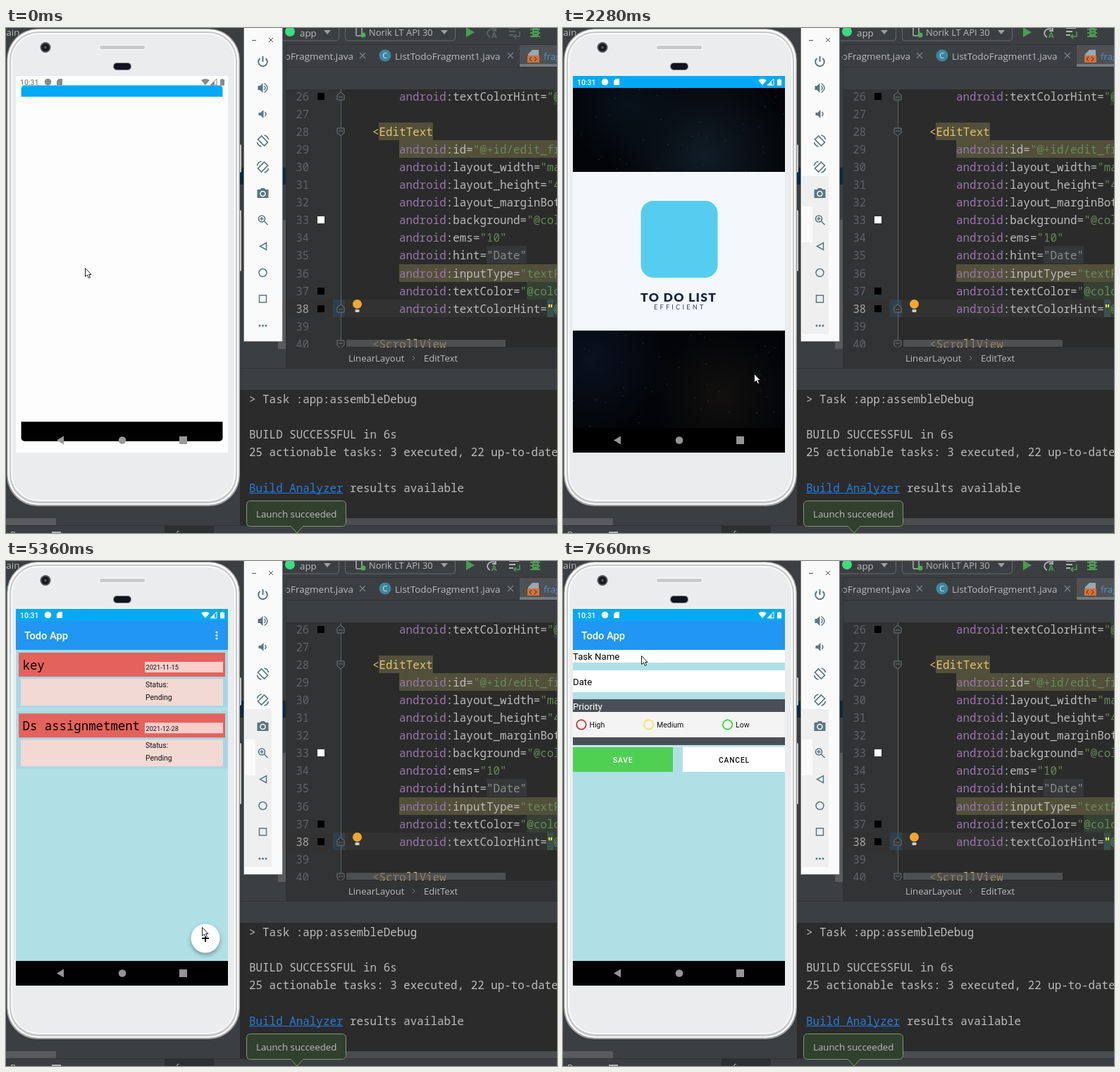
An HTML page with a canvas for the animation above (8000 ms loop, 782 by 716 pixels).

```html
<!DOCTYPE html>
<html lang="en">
<head>
<meta charset="utf-8">
<title>To-do app in an emulator</title>
<style>
html, body { margin: 0; width: 100%; height: 100%; overflow: hidden; background: #3c3f41; }
canvas { display: block; }
</style>
</head>
<body>
<canvas id="stage" width="782" height="716"></canvas>
<script>
const LOOP = 8000;
const MONO = '"Noto Sans Mono", monospace', UI = '"Open Sans", sans-serif', ROBOTO = 'Roboto, sans-serif';
const stage = document.getElementById('stage').getContext('2d');
const buffer = Object.assign(document.createElement('canvas'), { width: 782, height: 716 });
const bufferContext = buffer.getContext('2d');
let g = stage;

// ---- drawing helpers ----
function rect(x, y, w, h, color, radius = 0) {
  g.fillStyle = color;
  g.beginPath();
  g.roundRect(x, y, w, h, radius);
  g.fill();
}
function frame(x, y, w, h, color, radius = 0, width = 1) {
  g.strokeStyle = color;
  g.lineWidth = width;
  g.beginPath();
  g.roundRect(x, y, w, h, radius);
  g.stroke();
}
function disc(x, y, r, color) { rect(x - r, y - r, 2 * r, 2 * r, color, r); }
function ring(x, y, r, color, width) { frame(x - r, y - r, 2 * r, 2 * r, color, r, width); }
function shape(x, y, path, fill, line, width = 1.5) {
  const p = new Path2D(path);
  g.save();
  g.translate(x, y);
  if (fill) { g.fillStyle = fill; g.fill(p); }
  if (line) { g.strokeStyle = line; g.lineWidth = width; g.stroke(p); }
  g.restore();
}
function glow(x, y, r, color) {
  const fade = g.createRadialGradient(x, y, 0, x, y, r);
  fade.addColorStop(0, color);
  fade.addColorStop(1, color + '00');
  rect(14, 85, 301, 482, fade);
}
// y is the middle of the capitals; returns the x where the text ends
function text(s, x, y, size, color, font = UI, weight = 400, align = 'left', spacing = 0) {
  g.font = `${weight} ${size}px ${font}`;
  g.textAlign = align;
  g.letterSpacing = spacing + 'px';
  g.fillStyle = color;
  g.fillText(s, x, y + size * 0.355);
  return x + g.measureText(s).width;
}
const code = (s, x, y, color, weight) => text(s, x, y, 15.9, color, MONO, weight);
// Paints a layer as one group, scaled about the middle of the phone screen
function layer(paint, scale = 1, alpha = 1) {
  g = bufferContext;
  g.clearRect(0, 0, 782, 716);
  paint(scale);
  g = stage;
  g.save();
  g.beginPath();
  g.rect(14, 68, 301, 534);
  g.clip();
  g.globalAlpha = alpha;
  g.translate(164.5, 335);
  g.scale(scale, scale);
  g.drawImage(buffer, -164.5, -335);
  g.restore();
}

// ---- IDE ----
const lineY = n => Math.round(97 + 25.05 * (n - 26));

function editor() {
  const highlight = (x, y, w, color) => rect(x, y - 13, w, 25, color);
  rect(398, 87, 384, 366, '#2b2b2b');
  rect(398, 87, 77, 366, '#313335');
  highlight(398, lineY(38), 384, '#323232');
  highlight(464, lineY(38), 17, '#2f3f4d');
  rect(475, 87, 1, 366, '#606366');
  for (let n = 26; n <= 40; n++)
    text(n, 430, lineY(n), 15.5, n === 38 ? '#a4a3a3' : '#606366', MONO, 400, 'right');
  for (const n of [26, 33, 37, 38]) rect(442, lineY(n) - 5, 10, 10, n === 33 ? '#fff' : '#000');
  for (const n of [26, 28, 38, 40]) {
    const up = n === 26 || n === 38;
    shape(475, lineY(n), up ? 'M-5 5V-2L0-6L5-2V5ZM-3 1H3' : 'M-5-5V2L0 6L5 2V-5ZM-3-1H3', '#313335', '#737679', 1);
  }
  highlight(529, lineY(28), 77, '#52503a');
  code('EditText', code('<', 520, lineY(28), '#e8bf6a'), lineY(28), '#e8bf6a');
  code('<ScrollView', 520, lineY(40), '#e8bf6a');
  const attributes = [
    [26, 'textColorHint', '"@color'], [29, 'id', '"@+id/edit_fragment'], [30, 'layout_width', '"match_parent"'],
    [31, 'layout_height', '"40dp"'], [32, 'layout_marginBottom', '"8dp"'], [33, 'background', '"@color'],
    [34, 'ems', '"10"'], [35, 'hint', '"Date"'], [36, 'inputType', '"textPersonName'],
    [37, 'textColor', '"@color'], [38, 'textColorHint', '"@color']];
  for (const [n, name, value] of attributes) {
    const y = lineY(n);
    if (n === 29 || n === 36) highlight(558, y, 224, '#52503a');
    const x = code(`:${name}=`, code('android', 558, y, '#9876aa'), y, '#bababa');
    if (n === 35) highlight(x, y, 57, '#353739');
    if ([26, 37, 38].includes(n)) highlight(x + 9.5, y, 60, '#344134');
    if (n === 38) highlight(x, y, 9.5, '#3b514d');
    code(value, x, y, n === 35 ? '#8c8c8c' : '#6a8759');
    if (n === 38) code('"', x, y, '#ffef28', 700);
  }
  disc(498.5, 391.5, 6.5, '#f0a732');
  rect(495.5, 399, 6, 4, '#c9cbcd', 1);
  rect(483, 442, 226, 10, '#5f6062b0');
}

function ide(t) {
  rect(0, 0, 782, 716, '#3c3f41');
  text('main', -12, 6, 13.3, '#bbb');
  // run toolbar
  frame(385.5, -8, 87, 26, '#66696b', 4);
  disc(403, 5, 7, '#3ddc84');
  text('app', 417, 7, 13.3, '#bbb');
  shape(456, 6, 'M-5-3H5L0 3Z', '#9da0a2');
  frame(481.5, -8, 156, 26, '#66696b', 4);
  frame(497, -2, 8, 13, '#afb1b3', 1, 1.5);
  disc(507, 10, 3.5, '#4caf50');
  text('Norik LT API 30', 515, 6.5, 12.9, '#bbb');
  shape(622, 6, 'M-5-3H5L0 3Z', '#9da0a2');
  shape(653, 6, 'M0-7L12 0L0 7Z', '#499c54');
  const active = t < 630 ? '#606366' : '#afb1b3', green = t < 630 ? '#606366' : '#499c54';
  shape(689, 6, 'M5-4A7 6 0 1 0-2 7M6-7V-2H1', '', active, 1.8);
  text('A', 689, 10, 11, green, UI, 700);
  shape(714, 6, 'M0-6H14M0-1H9M0 4H6', '', active, 2);
  shape(726, 9, 'M3-4V3H-5M-2 0L-5 3L-2 6', '', green, 1.6);
  shape(751, 6, 'M-7-4H7M-7 1H7M-7 6H7', '', '#499c54', 1.8);
  rect(747, -1, 9, 14, '#499c54', 4);
  rect(749, 3, 5, 1, '#3c3f41');
  rect(749, 7, 5, 1, '#3c3f41');
  // tabs
  rect(398, 23, 384, 1, '#323232');
  rect(729, 24, 53, 28, '#4e5254');
  rect(729, 51, 53, 4, '#747a80');
  rect(398, 55, 384, 1, '#323232');
  text('oFragment.java', 493, 40, 13.5, '#bbb', UI, 400, 'right');
  text('ListTodoFragment1.java', 552, 40, 13.5, '#bbb');
  for (const x of [506, 716]) shape(x, 39, 'M-4-4L4 4M4-4L-4 4', '', '#7f8386', 1.2);
  disc(538, 39, 8.5, '#3e86a0');
  text('C', 538, 39, 11.5, '#d5e6ec', UI, 400, 'center');
  shape(741, 31, 'M6 0H15V10H0V6Z', '#9aa7b0');
  rect(740, 39, 17, 10, '#d3703a');
  shape(748, 44, 'M-2-3L-5 0L-2 3M2-3L5 0L2 3', '', '#3c2a20', 1);
  text('fragment', 763, 40, 13.5, '#4a8fd4');

  editor();
  rect(398, 453, 384, 29, '#313335');
  text('LinearLayout', 486, 468, 13.1, '#bbb');
  shape(579, 468, 'M-2-3L1 0L-2 3', '', '#7f8386', 1);
  text('EditText', 593, 468, 13.1, '#bbb');
  // project list showing beside the emulator
  rect(331, 198, 67, 24, '#0d293e');
  rect(386, 272, 11, 183, '#595b5d');
  rect(397, 24, 1, 458, '#323232');
  // console
  rect(332, 482, 450, 1, '#323232');
  rect(332, 513, 450, 192, '#2b2b2b');
  code('> Task :app:assembleDebug', 345, 526, '#bbb');
  code('BUILD SUCCESSFUL in 6s', 345, 576, '#bbb');
  code('25 actionable tasks: 3 executed, 22 up-to-date', 345, 601.5, '#bbb');
  const end = code('Build Analyzer', 345, 652, '#287bde');
  rect(345, 659, end - 345, 1, '#287bde');
  code(' results available', end, 652, '#bbb');
  rect(0, 695, 71, 10, '#595b5d');
  rect(483, 695, 299, 10, '#4b4d4f');
  rect(0, 705, 782, 11, '#3c3f41');
  rect(0, 705, 782, 1, '#323232');
  rect(225, 706, 70, 10, '#2d2f30');
  text('Run', 6, 718, 13, '#bbb');
  rect(65, 714, 13, 2, '#afb1b3');
  text('f', 241, 718, 13, '#bbb');
  shape(413, 706, 'M-9 0H9L0 10Z', '#32402f', '#7d9a70', 1);
  rect(341, 671, 142, 36, '#32402f', 5);
  frame(341.5, 670.5, 141, 36, '#7d9a70', 5);
  rect(405, 705.5, 16, 2, '#32402f');
  text('Launch succeeded', 355, 689, 13.3, '#bbb');
}

// ---- emulator ----
function phone() {
  rect(328, 165, 6, 40, '#c8c8c8', 2);
  rect(328, 258, 6, 87, '#c8c8c8', 2);
  rect(1, 1, 331, 677, '#a0a1a2', 44);
  rect(2.5, 2, 328, 674, '#fbfbfb', 43);
  rect(5, 5, 323, 669, '#c6c7c8', 41);
  rect(7, 7, 319, 664, '#fafafa', 39);
  rect(9, 9, 315, 660, '#ebecee', 37);
  disc(56, 27.5, 7.5, '#55585a');
  disc(56, 27.5, 5.5, '#17191c');
  disc(56, 27.5, 2, '#4d5054');
  rect(132, 24, 66, 7, '#fafafa', 3);
  rect(133, 25, 64, 5, '#c8c9ca', 2);
  rect(152, 49, 26, 11, '#8d9096', 5);
  rect(153, 50, 24, 9, '#11141f', 4.5);
}

function sidebar(t) {
  const c = '#5b7683';
  rect(337, 0, 56, 445, '#77797b');
  rect(338, 0, 54, 444, '#fafafa');
  if (t >= 2030) {
    rect(339, 210, 38, 224, '#efefef');
    rect(339, 253, 15, 51, '#fafafa');
  }
  rect(349, 17, 6, 1, '#555');
  shape(376, 17, 'M-3-3L3 3M3-3L-3 3', '', '#555', 1);
  shape(364.5, 48, 'M-4-5A6.3 6.3 0 1 0 4-5M0-8V0', '', c, 2);
  shape(364.5, 85, 'M-7-3H-4L0-7V7L-4 3H-7Z', c);
  shape(364.5, 85, 'M2-3Q5 0 2 3M2-6.5Q11 0 2 6.5', '', c);
  shape(363.5, 122, 'M-5-2H-2L2-6V6L-2 2H-5Z', c);
  shape(363.5, 122, 'M4-3Q7 0 4 3', '', c);
  shape(364.5, 160, 'M-2-7L-7-2L2 7L7 2ZM2-8A8 8 0 0 1 8-2M-8 2A8 8 0 0 0-2 8', '', c, 1.7);
  shape(364.5, 197, 'M2-7L7-2L-2 7L-7 2ZM-2-8A8 8 0 0 0-8-2M8 2A8 8 0 0 1 2 8', '', c, 1.7);
  shape(364.5, 234, 'M-8-5H-4L-2-7H2L4-5H8V7H-8Z', c);
  ring(364.5, 235, 3.5, '#fafafa', 1.5);
  ring(363, 270.5, 4.5, c, 1.6);
  shape(364.5, 272, 'M2 2L7 7M-4-1.5H1M-1.5-4V1', '', c);
  shape(364.5, 309.5, 'M5-5V5L-4 0Z', '', c);
  ring(364.5, 347, 5.5, c, 1.5);
  frame(359.5, 379, 10, 10, c, 0, 1.5);
  for (const x of [360, 364.5, 369]) disc(x, 422, 1.5, c);
}

function systemIcons(t) {
  const c = t < 390 ? '#8a8a8a' : '#fff';
  text('10:31', 20, 77, 10.4, c, ROBOTO, 500);
  disc(59.5, 76.5, 4.8, c);
  shape(72, 72, 'M3 0H8V9H0V3Z', c);
  shape(283, 81, 'M0 0L-6-7Q0-11 6-7Z', c);
  shape(290, 81, 'M0 0H9V-9Z', '', c, 1);
  shape(290, 81, 'M0 0H6V-6Z', c);
  shape(304, 72, 'M0 1H2V0H4V1H6V9.5H0Z', c);
  const nav = t < 390 ? '#9a9a9a' : t < 1230 ? '#f4f4f4' : t < 1470 ? '#c4c4c4' : '#949494';
  shape(72, 584.5, 'M0 0L10-6V6Z', nav);
  disc(165, 584.5, 5.3, nav);
  rect(246, 579, 11, 11, nav);
}

// ---- app screens ----
function bars() {
  rect(14, 68, 301, 17, '#03a9f4');
  rect(14, 567, 301, 35, '#000');
}
function launchWindow(scale) {
  const opening = scale < 1;
  rect(14, 68, 301, 17, '#03a9f4', opening ? [5, 5, 0, 0] : 0);
  rect(14, opening ? 570 : 567, 301, opening ? 29 : 35, '#000', opening ? [0, 0, 5, 5] : 0);
}
function splash() {
  rect(14, 85, 301, 482, '#020407');
  glow(200, 180, 130, '#101c26');
  glow(90, 110, 90, '#08121c');
  glow(40, 470, 110, '#0a1220');
  glow(225, 520, 100, '#12100f');
  let seed = 7;
  const random = () => (seed = seed * 16807 % 2147483647) / 2147483647;
  for (let i = 0; i < 130; i++)
    rect(14 + random() * 300, 85 + random() * 481, 1, 1, random() < 0.4 ? '#5a463c' : '#2c465a');
  rect(14, 204, 301, 225, '#f4f8fc');
  rect(110.5, 245, 109, 109, '#55cdee', 18);
  text('TO DO LIST', 110, 381.5, 17.5, '#1b2447', 'Lato, sans-serif', 900, 'left', 1.3);
  text('EFFICIENT', 129, 396, 9.2, '#3a4258', 'Lato, sans-serif', 400, 'left', 3.2);
}
function splashWindow() {
  bars();
  splash();
}
function appBar() {
  bars();
  rect(14, 85, 301, 482, '#b0e0e6');
  rect(14, 85, 301, 41, '#2196f3');
  text('Todo App', 26, 106, 14.7, '#fff', ROBOTO, 500);
}
function task(y, title, date) {
  rect(15, y - 3, 300, 81, '#a8d6e6');
  rect(18, y, 293, 34, '#e4625c');
  rect(197, y + 13, 111, 15, '#f8cdca');
  rect(21, y + 37, 287, 38, '#f2d9d2');
  text(title, 23.5, y + 17.5, 17.35, '#000', MONO);
  text(date, 198.5, y + 21, 9.2, '#111', ROBOTO);
  text('Status:', 198, y + 45, 10.4, '#111', ROBOTO);
  text('Pending', 198, y + 63.5, 10.4, '#111', ROBOTO);
}
function listWindow(fabColor) {
  appBar();
  for (const y of [101, 105.5, 110]) disc(299, y, 1.5, '#fff');
  task(130, 'key', '2021-11-15');
  task(216.3, 'Ds assignmetment', '2021-12-28');
  g.save();
  g.shadowColor = '#0005';
  g.shadowBlur = 6;
  g.shadowOffsetY = 3;
  disc(283, 535, 20.5, fabColor);
  g.restore();
  shape(283, 535, 'M-5 0H5M0-5V5', '', '#000', 2);
}
function formWindow() {
  appBar();
  const label = (s, x, y, color = '#000', size = 13.2) => text(s, x, y, size, color, ROBOTO);
  rect(14, 126, 301, 18, '#fff');
  label('Task Name', 14, 135.5);
  rect(14, 155, 301, 31, '#fff');
  label('Date', 14, 171);
  rect(14, 196, 301, 65, '#4a4f57');
  label('Priority', 14, 206, '#fff');
  rect(14, 214, 301, 36, '#f4f4f4');
  for (const [x, color, name] of [[26, '#e0161b', 'High'], [121.5, '#fbe04a', 'Medium'], [233.5, '#1be01f', 'Low']]) {
    ring(x, 232, 6.7, color, 1.6);
    label(name, x + 11.5, 232, '#111', 10.5);
  }
  rect(14, 261, 301, 3, '#c4e6ea');
  rect(14, 264, 142, 35, '#4fd053');
  rect(170, 264, 145, 35, '#fff');
  text('SAVE', 71, 282, 10.2, '#fff', ROBOTO, 500, 'left', 0.9);
  text('CANCEL', 221, 282, 10.2, '#111', ROBOTO, 500, 'left', 0.9);
}

// ---- timeline: rows of [start, ...values], each held until the next ----
const at = (rows, t) => rows.findLast(row => row[0] <= t).slice(1);

const POINTER = [
  [0, 112, 340], [150, 120, 348], [270, 135, 362], [390, 150, 377], [630, 161, 388], [1470, 221, 355],
  [1610, 328, 266], [1770, 345, 235], [1890, 354, 209], [2030, 330, 330], [2150, 290, 440], [2280, 271, 490],
  [5360, 278, 519], [5510, 280, 528], [5630, 282, 535], [6620, 245, 506], [6740, 238, 465], [6870, 225, 407],
  [7160, 185, 320], [7280, 135, 215], [7400, 106, 149], [7540, 108, 142], [7660, 111, 134]];
const LAUNCH = [[0, 0.95], [150, 0.97], [270, 0.985], [390, 1]];
// old window scale, new window scale, new window opacity
const TO_LIST = [[4730, 1.035, 0.95, 0.66], [4850, 1.045, 0.98, 1], [4980, 1.05, 0.995, 1], [5100, 1, 1, 1]];
const TO_FORM = [[6480, 1.005, 0.88, 0.3], [6620, 1.05, 0.99, 1], [6740, 1.05, 0.997, 1], [6870, 1, 1, 1]];
const FAB = [[0, '#fff'], [5910, '#dcdcdc'], [6200, '#ececec']];

function transition(rows, t, oldWindow, newWindow) {
  const [oldScale, newScale, alpha] = at(rows, t);
  layer(oldWindow, oldScale);
  layer(newWindow, newScale, alpha);
}

function draw(t) {
  ide(t);
  phone();
  sidebar(t);
  rect(14, 68, 301, 534, '#fdfdfd');
  const list = () => listWindow(at(FAB, t)[0]);
  if (t < 4730) {
    layer(launchWindow, at(LAUNCH, t)[0]);
    if (t >= 630) layer(splash, 1, t < 780 ? 0.33 : 1);
  } else if (t < 6480) transition(TO_LIST, t, splashWindow, list);
  else transition(TO_FORM, t, list, formWindow);
  systemIcons(t);
  const [x, y] = at(POINTER, t);
  shape(x + 0.5, y + 0.5, 'M0 0V12L2.8 9.5L5 14L7 13L5 9H8.5Z', '#fff', '#222', 1);
}

function tick() {
  draw(performance.now() % LOOP);
  requestAnimationFrame(tick);
}
tick();
</script>
</body>
</html>
```
